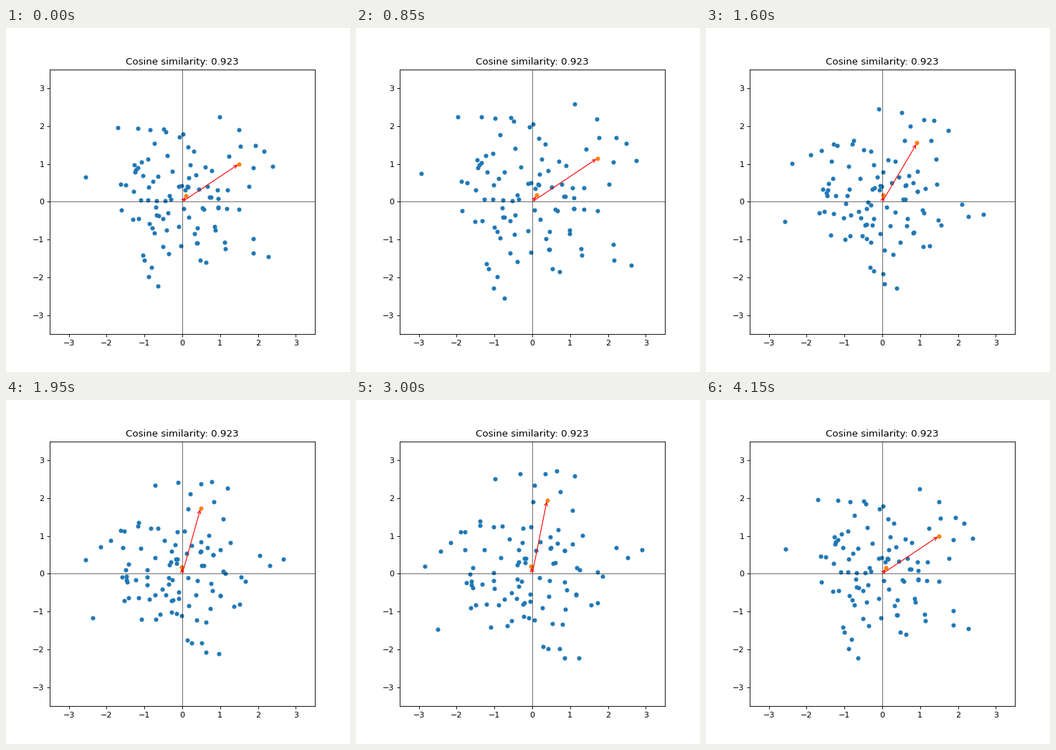
Animation, 480 px wide and 480 px high, one loop 4200 ms. Source, as a matplotlib script:

```python
import numpy as np
import matplotlib.pyplot as plt
from matplotlib.animation import FuncAnimation

HALF = 42      # frames in one scale + rotate phase
STEPS = 21     # frames of scaling, then of rotating
TURN = np.radians(45)

np.random.seed(0)
cloud = np.random.randn(100, 2)
pair = np.array([[1.5, 1.0], [0.1, 0.15]])


def pose(frame):
    """Scale factor and rotation angle at a frame."""
    phase, k = divmod(frame, HALF)
    scale = 1.5 - 0.05 * abs(k - 10) if k < STEPS else 1.0
    turned = max(0, k - STEPS + 1) / STEPS
    return scale, TURN * (1 - turned if phase else turned)


def transform(points, scale, angle):
    c, s = np.cos(angle), np.sin(angle)
    return scale * points @ np.array([[c, s], [-s, c]])


def cosine(a, b):
    return a @ b / (np.linalg.norm(a) * np.linalg.norm(b))


fig, ax = plt.subplots(figsize=(6, 6), dpi=80)
ax.set_xlim(-3.5, 3.5)
ax.set_ylim(-3.5, 3.5)
ax.set_aspect("equal")
ax.axhline(0, color="black", lw=0.5)
ax.axvline(0, color="black", lw=0.5)

dots = ax.scatter(*cloud.T, s=20)
ends = ax.scatter(*pair.T, s=20)
arrows = [
    ax.annotate("", xy=tip, xytext=(0, 0),
                arrowprops=dict(arrowstyle="->", color="red"))
    for tip in pair
]
title = ax.set_title("")


def update(frame):
    scale, angle = pose(frame)
    tips = transform(pair, scale, angle)
    dots.set_offsets(transform(cloud, scale, angle))
    ends.set_offsets(tips)
    for arrow, tip in zip(arrows, tips):
        arrow.xy = tuple(tip)
    title.set_text(f"Cosine similarity: {cosine(*tips):.3f}")
    return dots, ends, *arrows, title


anim = FuncAnimation(fig, update, frames=2 * HALF, interval=50,
                     repeat=True, repeat_delay=0)
plt.show()
```
